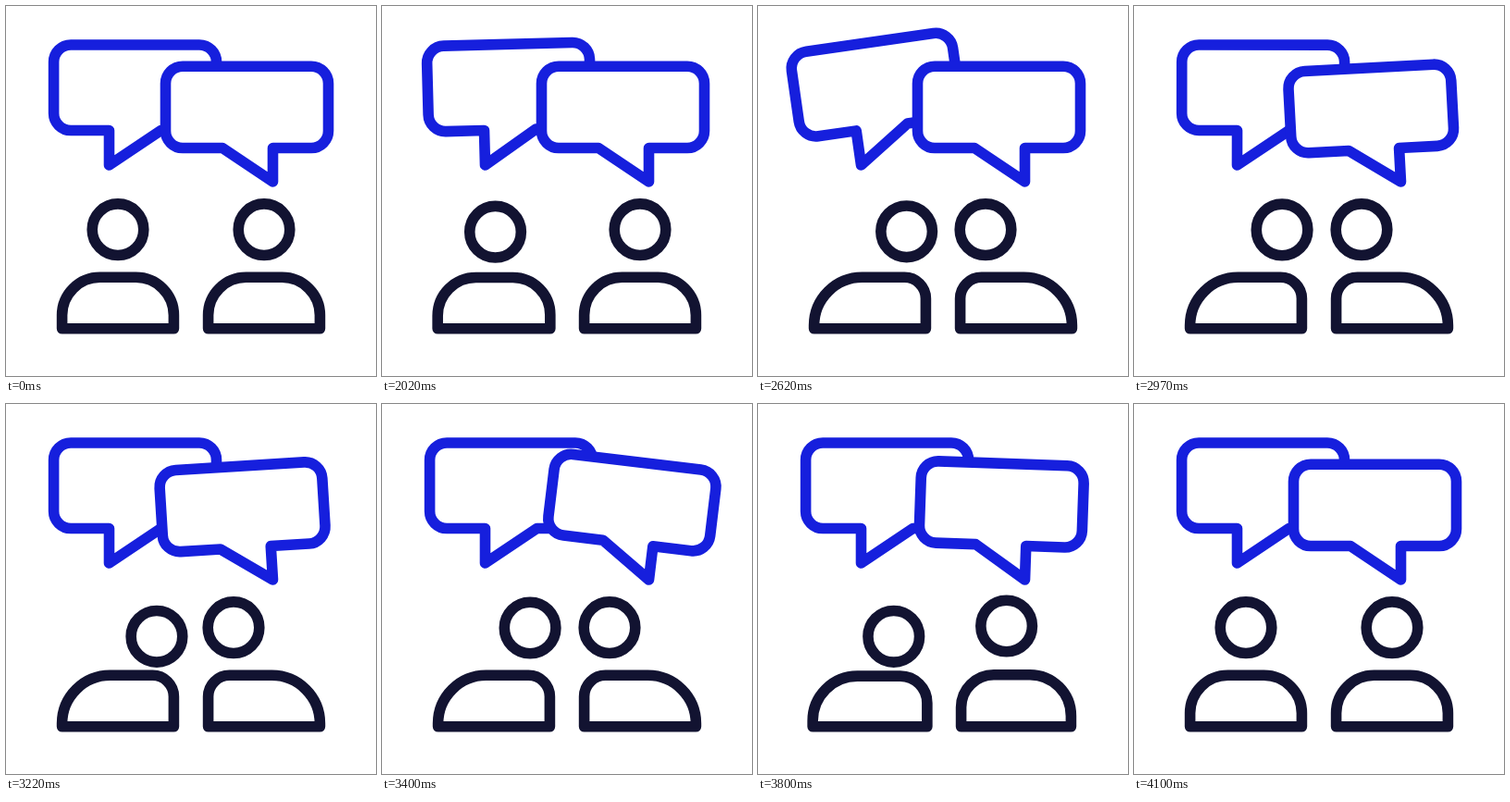
Write an HTML page with a canvas that moves like this. It is 400 px wide and 400 px high and loops after 4.12 s.

```html
<!DOCTYPE html>
<html lang="en">
<head>
<meta charset="utf-8">
<title>Conversation</title>
<style>
html, body { margin: 0; width: 100%; height: 100%; overflow: hidden; background: #fff; }
canvas { display: block; }
</style>
</head>
<body>
<canvas id="stage" width="400" height="400"></canvas>
<script>
const ctx = document.getElementById('stage').getContext('2d');
const LOOP = 4120, HOLD = 2020;
const BLUE = '#161fdd', NAVY = '#121331';

// Eased value through [time, value] keys
function track(t, keys) {
  if (t <= keys[0][0]) return keys[0][1];
  for (let i = 1; i < keys.length; i++) {
    const [t0, a] = keys[i - 1], [t1, b] = keys[i];
    if (t < t1) {
      const u = (t - t0) / (t1 - t0);
      return a + (b - a) * u * u * (3 - 2 * u);
    }
  }
  return keys[keys.length - 1][1];
}

// Damped swing in degrees
const SWING = [0, -21, 15, -9, 3, 0].map((deg, i) => [i * 200, deg]);
const swing = (t, start) => track(t - start, SWING) * Math.PI / 180;

function ink(color) {
  ctx.strokeStyle = color;
  ctx.fillStyle = '#fff';
  ctx.lineWidth = 11.6;
  ctx.lineJoin = ctx.lineCap = 'round';
}

// Bubble turning about the tip of its tail; root0 and root1 are the tail's ends
function bubble(angle, { l, t, r, b, tip, root0, root1 }) {
  const rad = 18.5;
  ctx.save();
  ctx.translate(tip[0], tip[1]);
  ctx.rotate(angle);
  ctx.translate(-tip[0], -tip[1]);
  ctx.beginPath();
  ctx.moveTo(tip[0], tip[1]);
  ctx.lineTo(root0, b);
  ctx.arcTo(l, b, l, t, rad);
  ctx.arcTo(l, t, r, t, rad);
  ctx.arcTo(r, t, r, b, rad);
  ctx.arcTo(r, b, l, b, rad);
  ctx.lineTo(root1, b);
  ctx.closePath();
  ink(BLUE);
  ctx.fill();
  ctx.stroke();
  ctx.restore();
}

const LEFT = { l: 51.6, t: 42, r: 227.5, b: 134.5, tip: [111.5, 172], root0: 111.5, root1: 167.5 };
const RIGHT = { l: 172.5, t: 65.2, r: 348.5, b: 153.5, tip: [288.5, 190], root0: 234, root1: 288.5 };

// Person drawn facing right; the mirrored one faces left
function person(t, { lean, go, back, mirror, nods }) {
  const turn = track(t, [[go, 0], [go + 300, 1], [back, 1], [back + 488, 0]]);
  const bounce = amp => track(t, [
    [go, 0], [go + 133, amp[0]], [go + 240, amp[1]], [go + 400, 0],
    [back, 0], [back + 133, amp[0]], [back + 300, amp[1]], [back + 480, 0]
  ]);
  const nod = nods ? track(t, [[2556, 0], [2773, 1], [2990, 0], [3207, 1], [3424, 0]]) : 0;
  const wide = bounce([2.4, -1]);

  ctx.save();
  if (mirror) {
    ctx.translate(400, 0);
    ctx.scale(-1, 1);
  }
  ink(NAVY);
  ctx.beginPath();
  ctx.arc(121 + lean * turn + 3 * nod, 241.7 + bounce([14, -1.7]) + 9.7 * nod, 27.8, 0, 7);
  ctx.stroke();

  const l = 60.6 - wide, r = 181.4 + wide, top = 293.3 + wide * 0.6, base = 348.8;
  const outer = 41 + 11 * turn, inner = 41 - 18 * turn, k = 0.448;
  ctx.beginPath();
  ctx.moveTo(l, base);
  ctx.lineTo(l, top + outer);
  ctx.bezierCurveTo(l, top + outer * k, l + outer * k, top, l + outer, top);
  ctx.lineTo(r - inner, top);
  ctx.bezierCurveTo(r - inner * k, top, r, top + inner * k, r, top + inner);
  ctx.lineTo(r, base);
  ctx.closePath();
  ctx.stroke();
  ctx.restore();
}

function draw(t) {
  if (t < HOLD) t = 0;
  ctx.fillStyle = '#fff';
  ctx.fillRect(0, 0, 400, 400);
  bubble(swing(t, 1988), LEFT);
  bubble(swing(t, 2923), RIGHT);
  person(t, { lean: 39, go: 1985, back: 3610, nods: true });
  person(t, { lean: 33, go: 2018, back: 3495, mirror: true });
}

const begin = performance.now();
function tick() {
  draw((performance.now() - begin) % LOOP);
  requestAnimationFrame(tick);
}
tick();
</script>
</body>
</html>
```
